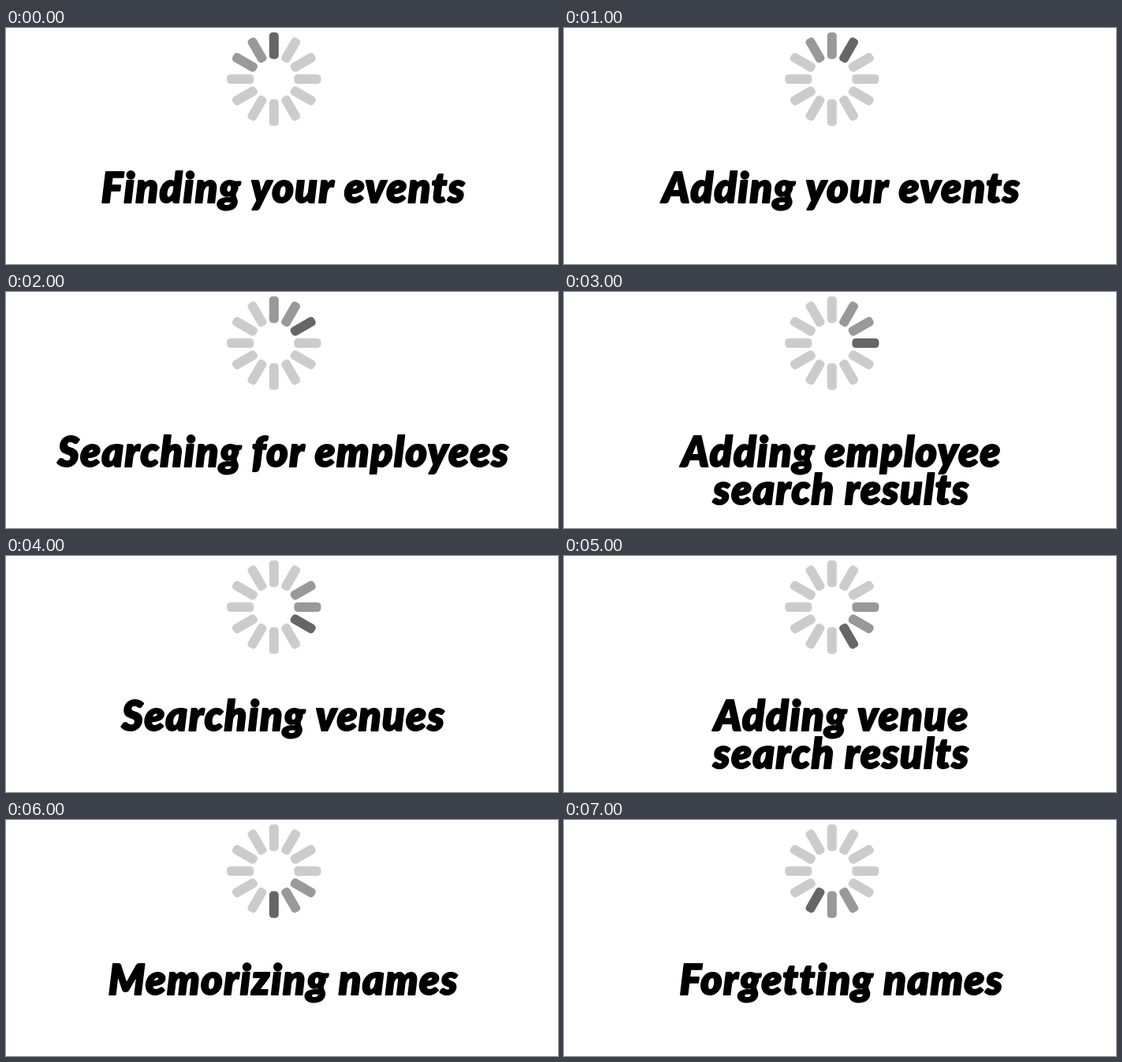
Write an HTML page with a canvas that moves like this. It is 700 by 300 pixels and loops after 8000 ms.

```html
<!DOCTYPE html>
<html lang="en">
<head>
<meta charset="utf-8">
<title>Loading messages</title>
<style>
  html, body { margin: 0; width: 100%; height: 100%; overflow: hidden; background: #fff; }
  canvas { display: block; }
</style>
</head>
<body>
<canvas id="stage" width="700" height="300"></canvas>
<script>
const ctx = document.getElementById('stage').getContext('2d');

const STEP_MS = 1000;
const MESSAGES = [
  ['Finding your events'],
  ['Adding your events'],
  ['Searching for employees'],
  ['Adding employee', 'search results'],
  ['Searching venues'],
  ['Adding venue', 'search results'],
  ['Memorizing names'],
  ['Forgetting names']
];

const SPOKES = 12;
const TRAIL = ['#666', '#999', '#999'];
const REST = '#ccc';

function drawSpinner(lead) {
  for (let i = 0; i < SPOKES; i++) {
    const age = (lead - i + SPOKES) % SPOKES;
    ctx.save();
    ctx.translate(339.8, 65);
    ctx.rotate(i * 2 * Math.PI / SPOKES);
    ctx.fillStyle = TRAIL[age] || REST;
    ctx.beginPath();
    ctx.roundRect(-6, -59.6, 12, 34, 4.5);
    ctx.fill();
    ctx.restore();
  }
}

function drawMessage(lines) {
  ctx.font = 'italic 900 52px Lato, "Open Sans", sans-serif';
  ctx.letterSpacing = '1.5px';
  ctx.textAlign = 'center';
  ctx.textBaseline = 'alphabetic';
  ctx.fillStyle = ctx.strokeStyle = '#000';
  ctx.lineWidth = 2;
  ctx.lineJoin = 'round';
  lines.forEach((line, i) => {
    const y = 221.5 + i * 48;
    ctx.fillText(line, 352, y);
    ctx.strokeText(line, 352, y); // thickens the heaviest available weight
  });
}

function render() {
  const step = Math.floor(performance.now() / STEP_MS) % MESSAGES.length;
  ctx.fillStyle = '#fff';
  ctx.fillRect(0, 0, 700, 300);
  drawSpinner(step);
  drawMessage(MESSAGES[step]);
  requestAnimationFrame(render);
}

render();
</script>
</body>
</html>
```
